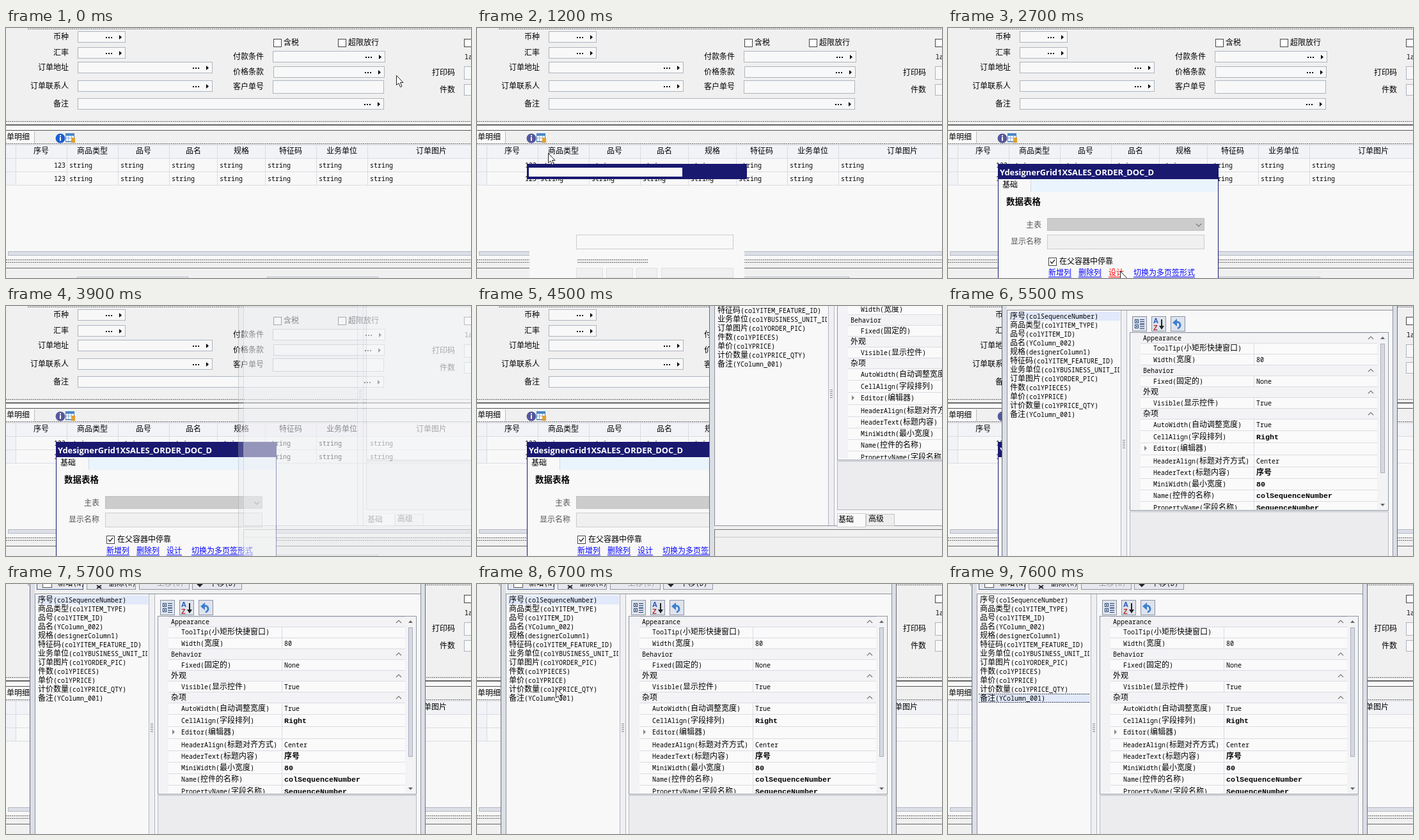
These frames come from a looping animation (727x392 px, 8000 ms). An HTML page with a canvas:

```html
<!DOCTYPE html>
<html lang="zh">
<head>
<meta charset="utf-8">
<style>
html, body { margin: 0; width: 100%; height: 100%; overflow: hidden; background: #f0f0f0; }
canvas { display: block; }
</style>
</head>
<body>
<canvas id="stage" width="727" height="392"></canvas>
<script>
const g = document.getElementById('stage').getContext('2d');
const LOOP = 8000, STEP = 100;
const INK = '#000', LINE = '#abb5be', SOFT = '#d9dce4', NAVY = '#191970', BLUE = '#0000ff';

function fill(x, y, w, h, color) {
  g.fillStyle = color;
  g.fillRect(x, y, w, h);
}

function box(x1, y1, x2, y2, color, border = LINE) {
  fill(x1, y1, x2 - x1, y2 - y1, color);
  g.strokeStyle = border;
  g.lineWidth = 1;
  g.strokeRect(x1 + .5, y1 + .5, x2 - x1 - 1, y2 - y1 - 1);
}

function path(points, color, width = 0) {
  g.beginPath();
  points.forEach(([x, y]) => g.lineTo(x, y));
  if (width) {
    g.lineWidth = width;
    g.strokeStyle = color;
    g.stroke();
  } else {
    g.fillStyle = color;
    g.fill();
  }
}

function dots(x1, x2, y, color = '#666') {
  g.setLineDash([2, 1]);
  path([[x1, y + .5], [x2, y + .5]], color, 1);
  g.setLineDash([]);
}

// Full-width glyphs take 12px, half-width ones 6px (7px in bold); y is the middle of the line.
function text(str, x, y, { color = INK, bold = false, align = 0, size = 12 } = {}) {
  const runs = str.match(/[\x00-\xff]+|[^\x00-\xff]+/g).map(s => {
    const font = s.charCodeAt(0) > 255
      ? `${size}px "Noto Sans CJK SC", "Noto Sans CJK", sans-serif`
      : bold ? '11.67px "Liberation Mono", monospace' : '10px "Noto Sans Mono", monospace';
    g.font = (bold ? 'bold ' : '') + font;
    return { s, font: g.font, w: g.measureText(s).width };
  });
  x -= align * runs.reduce((sum, r) => sum + r.w, 0);
  g.fillStyle = color;
  for (const r of runs) {
    g.font = r.font;
    g.fillText(r.s, Math.round(x), Math.floor(y + 4.5));
    x += r.w;
  }
}

function link(str, x, y, color = BLUE) {
  text(str, x, y, { color });
  fill(x, y + 6, str.length * 12, 1, color);
}

function checkbox(x, y, checked) {
  box(x, y, x + 13, y + 13, '#fff', '#444');
  if (checked) path([[x + 3, y + 6], [x + 5.5, y + 9], [x + 10, y + 3.5]], '#222', 1.3);
}

function chevron(x, y, dir) {
  path([[x - 4, y - 2 * dir], [x, y + 2 * dir], [x + 4, y - 2 * dir]], '#777', 1.2);
}

function field(x1, y1, x2, y2, picker = true) {
  box(x1, y1, x2, y2, '#f8f8f8');
  if (!picker) return;
  const y = (y1 + y2) >> 1;
  for (const d of [-31, -27, -23]) fill(x2 + d, y, 2, 2, INK);
  path([[x2 - 10, y - 3], [x2 - 6, y + .5], [x2 - 10, y + 4]], INK);
}

function form() {
  fill(0, 0, 727, 392, '#f0f0f0');
  dots(34, 727, 1);
  [['币种', 14], ['汇率', 39], ['订单地址', 62], ['订单联系人', 91], ['备注', 119]]
    .forEach(([s, y]) => text(s, 98, y, { align: 1 }));
  [['付款条件', 45], ['价格条款', 69], ['客户单号', 92]]
    .forEach(([s, y]) => text(s, 403, y, { align: 1 }));
  text('打印码', 666, 70);
  text('件数', 678, 97);
  text('label', 717, 45);
  field(112, 5, 187, 23);
  field(112, 30, 187, 48);
  field(112, 53, 323, 71);
  field(112, 82, 323, 100);
  field(112, 110, 591, 128);
  field(417, 36, 593, 54);
  field(418, 60, 592, 78);
  field(417, 82, 591, 103, false);
  field(716, 60, 800, 81, false);
  field(716, 88, 800, 106, false);
  [418, 519, 716].forEach(x => checkbox(x, 17));
  text('含税', 434, 23);
  text('超限放行', 535, 23);
  dots(0, 727, 146);
  fill(0, 151, 727, 2, '#666');
  fill(0, 153, 727, 7, '#fafafa');
  fill(0, 160, 727, 1, '#555');
}

function icons(dimmed) {
  g.fillStyle = dimmed ? '#55589c' : '#1c5fd0';
  g.beginPath();
  g.arc(85, 173, 7.5, 0, 7);
  g.fill();
  fill(84, 168, 2, 2, '#fff');
  fill(84, 171, 2, 6, '#fff');
  box(93, 165, 107, 179, '#fff', '#4a7fb5');
  fill(93, 165, 14, 4, '#4a86c8');
  for (const d of [4, 9]) {
    fill(93 + d, 169, 1, 9, '#8fb0d4');
    fill(94, 168 + d, 12, 1, '#8fb0d4');
  }
  fill(102, 172, 6, 8, '#e0a030');
}

function grid(dimmed) {
  fill(0, 162, 44, 19, '#fafafa');
  fill(44, 162, 1, 19, '#bbb');
  text('单明细', 1, 171);
  icons(dimmed);
  dots(0, 727, 181);
  fill(0, 183, 727, 180, '#f8f8f8');
  fill(0, 184, 727, 20, '#f2f3f7');
  const columns = [[15, '序号', 55], [95, '商品类型', 135], [175, '品号', 215], [255, '品名', 293],
    [330, '规格', 368], [405, '特征码', 445], [485, '业务单位', 525], [565, '订单图片', 665]];
  fill(0, 205, 15, 41, '#f2f3f7');
  [183, 204, 225, 246].forEach(y => fill(0, y, 727, 1, SOFT));
  columns.forEach(([x, title, mid], i) => {
    fill(x, 184, 1, 63, SOFT);
    text(title, mid, 193, { align: .5 });
    for (const y of [215, 236])
      i ? text('string', x + 4, y) : text('123', 93, y, { align: 1 });
  });
  box(3, 350, 740, 357, '#dcdfe6', '#b4b8c2');
  dividers(0, 727);
  fill(0, 376, 727, 1, '#666');
  box(111, 390, 285, 400, '#f8f8f8');
  box(408, 390, 582, 400, '#f8f8f8');
}

function dividers(x1, x2) {
  fill(x1, 362, x2 - x1, 8, '#f0f0f0');
  dots(x1, x2, 363);
  dots(x1, x2, 367);
}

function popupFrame() {
  fill(78, 213, 344, 24, NAVY);
  fill(81, 219, 240, 14, '#f8f8f8');
  fill(82, 349, 336, 43, '#f8f8f8');
  dividers(157, 267);
  box(155, 324, 401, 347, '#f8f8f8', '#ccc');
  [[155, 197], [202, 244], [249, 282], [288, 401]]
    .forEach(([x1, x2]) => box(x1, 376, x2, 392, '#f0f0f0', '#e0e0e0'));
}

function popup(hot) {
  fill(78, 213, 345, 180, NAVY);
  fill(79, 237, 343, 156, '#f8f8f8');
  fill(130, 237, 292, 20, '#eaf4fd');
  fill(129, 237, 1, 20, '#d0d8e0');
  g.font = 'bold 12.9px "Open Sans", sans-serif';
  g.fillStyle = '#fff';
  g.fillText('YdesignerGrid1XSALES_ORDER_DOC_D', 81, 231);
  text('基础', 85, 246);
  text('数据表格', 91, 273, { bold: true, size: 13.5 });
  text('主表', 146, 309, { align: 1, color: '#555' });
  text('显示名称', 146, 335, { align: 1, color: '#555' });
  box(155, 298, 401, 318, '#cccccc', '#bfbfbf');
  chevron(392, 309, 1);
  box(155, 324, 401, 347, '#f0f0f0', '#ccc');
  checkbox(157, 360, true);
  text('在父容器中停靠', 174, 366);
  link('新增列', 157, 384);
  link('删除列', 204, 384);
  link('设计', 251, 384, hot ? '#ff0000' : BLUE);
  link('切换为多页签形式', 290, 384);
}

const COLUMN_ITEMS = ['序号(colSequenceNumber)', '商品类型(colYITEM_TYPE)', '品号(colYITEM_ID)',
  '品名(YColumn_002)', '规格(designerColumn1)', '特征码(colYITEM_FEATURE_ID)',
  '业务单位(colYBUSINESS_UNIT_ID)', '订单图片(colYORDER_PIC)', '件数(colYPIECES)',
  '单价(colYPRICE)', '计价数量(colYPRICE_QTY)', '备注(YColumn_001)'];

// [middle of row, name, value, bold]; rows without a value are categories.
const PROPERTIES = [
  [59, 'Appearance'], [75, 'ToolTip(小矩形快捷窗口)', ' '], [93, 'Width(宽度)', '80'],
  [110, 'Behavior'], [127, 'Fixed(固定的)', 'None'],
  [144, '外观'], [161, 'Visible(显示控件)', 'True'],
  [178, '杂项'], [195, 'AutoWidth(自动调整宽度)', 'True'], [214, 'CellAlign(字段排列)', 'Right', true],
  [232, 'Editor(编辑器)', ' '], [252, 'HeaderAlign(标题对齐方式)', 'Center'],
  [270, 'HeaderText(标题内容)', '序号', true], [288, 'MiniWidth(最小宽度)', '80', true],
  [306, 'Name(控件的名称)', 'colSequenceNumber', true],
  [325, 'PropertyName(字段名称)', 'SequenceNumber', true]];

function clipped(x, y, w, h, draw) {
  g.save();
  g.beginPath();
  g.rect(x, y, w, h);
  g.clip();
  draw();
  g.restore();
}

function columnList(selected) {
  const y = 18 + selected * 14;
  fill(48, y, 174, 14, '#e1e9fa');
  if (selected) {
    dots(48, 222, y, '#445');
    dots(48, 222, y + 13, '#445');
  }
  clipped(48, 17, 173, 414, () => COLUMN_ITEMS.forEach((s, i) => text(s, 50, 25 + i * 14)));
}

function propertyGrid() {
  clipped(238, 51, 402, 277, () => {
    fill(238, 51, 386, 277, '#f3f3f5');
    PROPERTIES.forEach(([y, name, value, bold], i) => {
      const top = i ? (PROPERTIES[i - 1][0] + y) >> 1 : 51;
      const next = i < 15 ? (y + PROPERTIES[i + 1][0]) >> 1 : 334;
      fill(254, top, 370, 1, SOFT);
      if (value) {
        fill(254, top + 1, 370, next - top - 1, '#fafafa');
        fill(431, top, 1, next - top, SOFT);
        text(name, 274, y);
        text(value, 435, y, { bold });
      } else {
        text(name, 258, y);
        chevron(614, y, -1);
      }
    });
    path([[260, 228], [264, 232], [260, 236]], '#888');
    fill(624, 51, 17, 278, '#f3f3f5');
    box(629, 68, 636, 271, '#d6d9e1', '#a9aebb');
    path([[629, 61], [632.5, 57], [636, 61]], '#666');
    path([[629, 319], [632.5, 323], [636, 319]], '#666');
  });
}

function toolButtons() {
  [241, 271, 301].forEach(x => box(x, 25, x + 23, 49, '#dfe3ec', '#8b92a2'));
  for (const y of [30, 38]) {
    box(245, y, 251, y + 6, '#fff', '#1d3f70');
    fill(247, y + 2, 2, 2, '#1d3f70');
    for (const d of [0, 3, 6]) fill(253, y + d, 7, 1, '#1d3f70');
  }
  g.font = 'bold 11px "Liberation Sans", sans-serif';
  g.fillStyle = '#2455b8';
  g.fillText('A', 274, 36);
  g.fillStyle = '#b02a2a';
  g.fillText('Z', 274, 47);
  fill(286, 30, 2, 12, '#222');
  path([[283, 40], [287, 46], [291, 40]], '#222');
  path([[304, 35], [311, 29], [311, 41]], '#3d7fd0');
  g.beginPath();
  g.arc(311, 39, 5, -1.6, 1.4);
  g.strokeStyle = '#3d7fd0';
  g.lineWidth = 3;
  g.stroke();
}

function toolbar() {
  [[48, 121, '新增(N)', 81], [126, 203, '删除(R)', 161], [208, 287, '上移(U)', 236], [291, 369, '下移(D)', 318]]
    .forEach(([x1, x2, s, x], i) => {
      box(x1, -15, x2, 9, '#e6e8ee', i ? '#8f95a3' : '#4a5f8c');
      text(s, x, -1, { color: i === 2 ? '#999' : INK });
    });
  box(57, -6, 72, 6, '#fff', '#555');
  path([[142, 2], [149, 7]], '#222', 2);
  path([[149, 2], [142, 7]], '#222', 2);
  path([[216, -1], [228, -1], [222, -7]], '#999');
  path([[297, -1], [309, -1], [303, 5]], '#222');
}

function designer(dx, dy, selected, loaded) {
  g.save();
  g.translate(dx, dy);
  box(37, -40, 656, 500, '#dcdfe6', '#6b6e78');
  fill(45, -40, 604, 540, '#f0f0f0');
  fill(648, -40, 1, 540, '#8d919b');
  box(45, 15, 649, 433, '#f8f8f9', '#8d919b');
  fill(223, 16, 1, 416, '#b0b5c0');
  fill(224, 16, 8, 416, '#f0f0f2');
  fill(232, 16, 1, 416, '#b0b5c0');
  for (let y = 219; y < 232; y += 3) fill(226, y, 4, 1, '#888');
  toolbar();
  toolButtons();
  box(237, 50, 642, 330, '#fafafa', '#8d939e');
  box(237, 331, 642, 408, '#ececef', '#b4b8c2');
  box(237, 413, 282, 435, '#fafafa', '#d0d0d0');
  box(282, 414, 327, 433, '#eeeeee', '#c4c4c4');
  text('基础', 239, 423);
  text('高级', 286, 422);
  box(45, 438, 650, 500, '#f0f0f0', '#777');
  fill(46, 450, 603, 1, '#c8c8c8');
  if (loaded > 0) columnList(selected);
  if (loaded > 1) propertyGrid();
  g.restore();
}

// Pointer keys: [time, x, y]
const POINTER_TRACKS = [
  [[0, 610, 74], [300, 420, 105], [600, 38, 196], [900, 84, 172], [1000, 84, 172], [1200, 111, 196],
    [1900, 258, 380], [2000, 262, 382], [2100, 262, 382], [2200, 246, 381], [2400, 269, 381], [3800, 269, 381]],
  [[6000, 305, 40], [6800, 97, 180], [7200, 97, 180], [7500, 418, 376]]];

function pointer(t) {
  const track = POINTER_TRACKS.find(k => t >= k[0][0] && t <= k[k.length - 1][0]);
  if (!track) return;
  const i = Math.max(1, track.findIndex(k => k[0] >= t));
  const [t0, x0, y0] = track[i - 1], [t1, x1, y1] = track[i];
  const p = (t - t0) / (t1 - t0);
  g.save();
  g.translate(Math.round(x0 + (x1 - x0) * p) + .5, Math.round(y0 + (y1 - y0) * p) + .5);
  const arrow = [[0, 0], [0, 15], [3.5, 12], [6, 18], [8.5, 17], [6, 11], [10.5, 11], [0, 0]];
  path(arrow, '#fff');
  path(arrow, '#222', 1);
  g.restore();
}

function render(time) {
  const t = Math.floor(time % LOOP / STEP) * STEP;
  form();
  grid(t >= 1100);
  if (t >= 1300) popup(t >= 2700 && t < 3900);
  else if (t >= 1100) popupFrame();
  if (t >= 3900) {
    const left = 1 - Math.min(1, Math.max(0, (t - 5000) / 700));
    g.globalAlpha = Math.min(1, (t - 3800) / 400);
    designer(Math.round(326 * left ** 1.55), -Math.round(88 * left ** 1.86),
      t >= 7000 ? 11 : 0, t >= 4500 ? 2 : t >= 4400 ? 1 : 0);
    g.globalAlpha = 1;
  }
  pointer(t);
}

const start = performance.now();
(function tick() {
  render(performance.now() - start);
  requestAnimationFrame(tick);
})();
</script>
</body>
</html>
```
